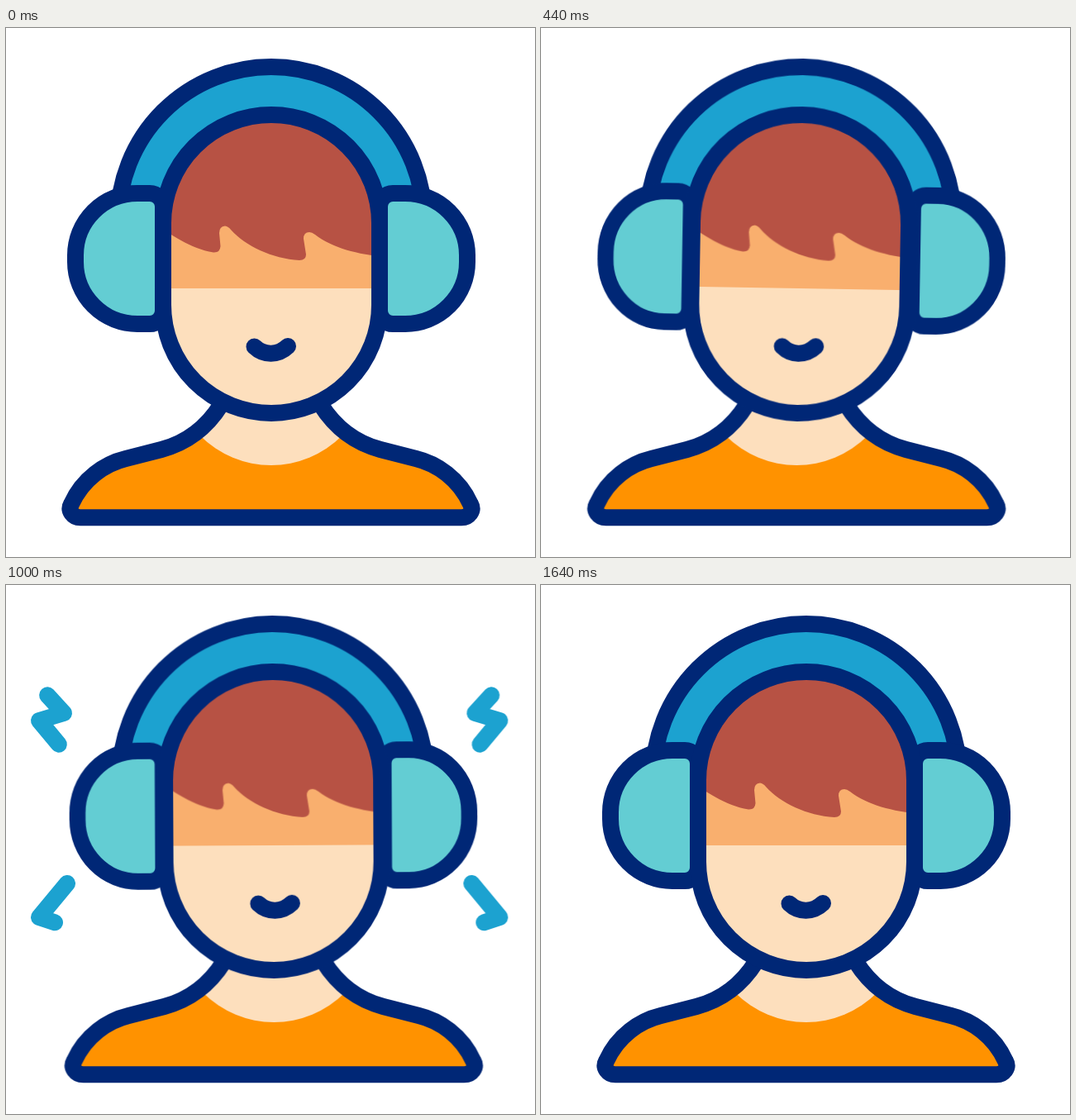
Recreate the animation shown at these times as an HTML page. Size 640 px wide and 640 px high, loop 2.48 s.

```html
<!DOCTYPE html>
<html lang="en">
<head>
<meta charset="utf-8">
<title>Listening to music</title>
<style>
  @property --from { syntax: "<length>"; inherits: false; initial-value: 0px; }
  @property --to { syntax: "<length>"; inherits: false; initial-value: 0px; }

  :root { --swing: 2480ms cubic-bezier(.37, 0, .63, 1) infinite; }
  html, body { margin: 0; width: 100%; height: 100%; overflow: hidden; background: #fff; }
  svg { display: block; width: 100%; height: 100%; }

  .line { stroke: #002776; stroke-width: 20; stroke-linejoin: round; stroke-linecap: round; }
  .skin { fill: #fddfbd; }

  .sway { animation: sway var(--swing); }
  .tilt { transform-origin: 321px 500px; animation: tilt var(--swing); }
  .turn { animation: turn var(--swing); }
  .ears { animation: ears var(--swing); }
  .ear { fill: #63cdd3; transform-origin: 84px 279px; animation: squeeze-left var(--swing); }
  .right { animation-name: squeeze-right; }
  .bolt {
    fill: none; stroke: #1ca2d0; stroke-width: 20; opacity: 0;
    stroke-linejoin: round; stroke-linecap: round;
    stroke-dasharray: calc(var(--to) - var(--from)) 300px;
    stroke-dashoffset: calc(0px - var(--from));
    animation: grow var(--swing), shrink var(--swing), show 2480ms step-end infinite;
  }
  .late { animation-delay: 100ms, 120ms, 100ms; }

  @keyframes sway {
    0%, 43.31%, 100% { transform: translateX(0); }
    10.32% { transform: translateX(15px); }
    23.15% { transform: translateX(-27px); }
    34.03% { transform: translateX(15px); }
  }
  @keyframes tilt {
    0%, 66.13%, 100% { transform: rotate(0deg); }
    10.32% { transform: rotate(-1.95deg); }
    22.78% { transform: rotate(2.5deg); }
    33.91% { transform: rotate(-1.95deg); }
    44.35% { transform: rotate(.5deg); }
  }
  @keyframes turn {
    0%, 60.48%, 100% { transform: translateX(0); }
    10.89% { transform: translateX(calc(var(--depth) * 9px)); }
    25.4% { transform: translateX(calc(var(--depth) * -9px)); }
    35.08% { transform: translateX(calc(var(--depth) * 9px)); }
    47.58% { transform: translateX(calc(var(--depth) * -9.5px)); }
  }
  @keyframes ears {
    0%, 64.52%, 100% { transform: translateX(0); }
    10.89% { transform: translateX(-6px); }
    21.77% { transform: translateX(5px); }
    34.68% { transform: translateX(-2px); }
    45.97% { transform: translateX(2.2px); }
  }
  @keyframes squeeze-left {
    0%, 66.13%, 100% { transform: scaleX(1); }
    11.29% { transform: scaleX(.997); }
    17.74%, 27.42% { transform: scaleX(.965); }
    40.32%, 50% { transform: scaleX(.976); }
  }
  @keyframes squeeze-right {
    0%, 50%, 100% { transform: scaleX(1); }
    11.29% { transform: scaleX(.936); }
    17.74%, 27.42% { transform: scaleX(.971); }
    40.32% { transform: scaleX(.976); }
  }
  @keyframes grow {
    0%, 24.19% { --to: 0px; }
    48.39%, 100% { --to: 100px; }
  }
  @keyframes shrink {
    0%, 35.48% { --from: 0px; }
    58.47%, 100% { --from: 100px; }
  }
  @keyframes show {
    0% { opacity: 0; }
    24.8% { opacity: 1; }
    58% { opacity: 0; }
  }
</style>
</head>
<body>
<svg viewBox="0 0 640 640">
  <defs>
    <path id="torso" d="M320.5 592.2H90C81 592.2 74.5 584 79 576C93 545 120 527 145 521L188 510C218 502 243 483 260 456V440H381V456C398 483 423 502 453 510L496 521C521 527 548 545 562 576C566.5 584 560 592.2 551 592.2Z"/>
    <rect id="face" x="190" y="105" width="262" height="361" rx="131"/>
    <clipPath id="inTorso"><use href="#torso"/></clipPath>
    <clipPath id="inFace"><use href="#face"/></clipPath>
  </defs>

  <g>
    <path class="bolt" pathLength="100" d="M74 205L40 164L70 155L25 106"/>
    <path class="bolt late" pathLength="100" d="M74 361L40 402L70 412L29 457"/>
  </g>
  <g transform="matrix(-1 0 0 1 637.4 0)">
    <path class="bolt" pathLength="100" d="M74 205L40 164L70 155L25 106"/>
    <path class="bolt late" pathLength="100" d="M74 361L40 402L70 412L29 457"/>
  </g>

  <g class="sway">
    <use href="#torso" fill="#ff9200"/>
    <circle class="skin" cx="320.7" cy="408" r="121" clip-path="url(#inTorso)"/>
    <use href="#torso" class="line" fill="none"/>

    <g class="tilt">
      <path class="line" fill="#1ca2d0" d="M135.8 232A185 185 0 0 1 505.8 232Z"/>

      <g class="ears">
        <path class="ear line" d="M159 200H174a16 16 0 0 1 16 16V342a16 16 0 0 1 -16 16H159a75 75 0 0 1 -75 -75v-8a75 75 0 0 1 75 -75Z"/>
        <g transform="matrix(-1 0 0 1 642 0)">
          <path class="ear right line" d="M159 200H174a16 16 0 0 1 16 16V342a16 16 0 0 1 -16 16H159a75 75 0 0 1 -75 -75v-8a75 75 0 0 1 75 -75Z"/>
        </g>
      </g>

      <use href="#face" class="skin"/>
      <g clip-path="url(#inFace)">
        <rect x="180" y="100" width="282" height="215" fill="#f9af6e"/>
        <path class="turn" style="--depth: .87" fill="#b75244" d="M150 60V220L180 238C198 248 222 267 251 271.5Q259 272 259.5 264L258 248Q258 240 265 239.5Q269 240 272 244C290 264 322 279 355 281Q363 281 363 274L360 255Q360 247 367 247Q370 247 374 250C395 266 425 274 460 277H490V60Z"/>
      </g>
      <use href="#face" class="line" fill="none"/>
      <path class="turn line" style="--depth: 1" fill="none" d="M300.5 385.5C312 396.5 329 396.5 341 385"/>
    </g>
  </g>
</svg>
</body>
</html>
```
